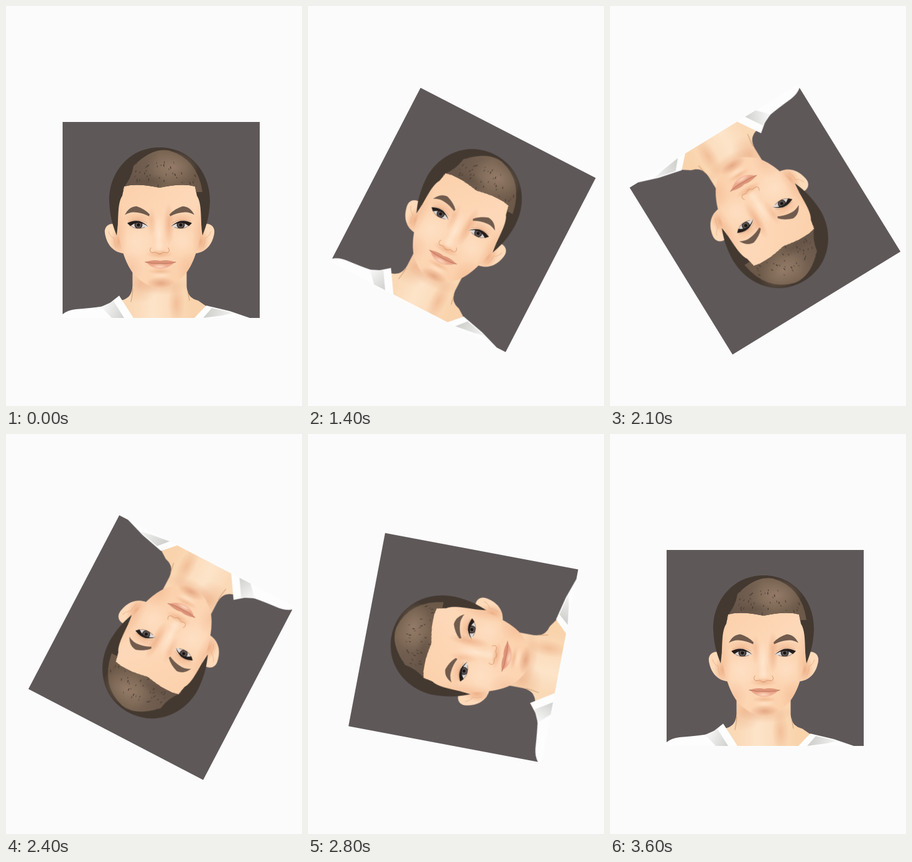
These frames come from a looping animation (476x645 px, 4.4 s). An HTML page with a canvas:

```html
<!DOCTYPE html>
<html lang="en">
<head>
<meta charset="utf-8">
<title>Rotating portrait</title>
<style>
html, body { margin: 0; width: 100%; height: 100%; overflow: hidden; background: #fbfbfb; }
canvas { display: block; }
</style>
</head>
<body>
<canvas id="stage" width="476" height="645"></canvas>
<script>
const W = 476, H = 645, LOOP = 4400, STEP = 100;
const CENTER = { x: 249.5, y: 344.7 };
const AXIS = 247;
const stage = document.getElementById('stage').getContext('2d');

// Moments (ms) and progress of the turn, even in between.
const PACE = [[1000, .028], [1400, .1776], [1800, .3388], [2800, .689], [3600, 1]];

function angleAt(ms) {
  const t = Math.floor(ms / STEP) * STEP;
  const next = PACE.findIndex(([time]) => time > t);
  if (next < 1) return 0;
  const [t0, p0] = PACE[next - 1], [t1, p1] = PACE[next];
  const progress = p0 + (p1 - p0) * (t - t0) / (t1 - t0);
  return Math.PI * (1 - Math.cos(Math.PI * progress));
}

function seeded(seed) {
  return () => (seed = (seed * 16807) % 2147483647) / 2147483647;
}

// Builds a path from one half; x counts outwards from the face axis.
function mirrored(half) {
  const path = new Path2D(), side = new Path2D(half);
  for (const s of [-1, 1]) path.addPath(side, new DOMMatrix([s, 0, 0, 1, AXIS, 0]));
  return path;
}

function drawPortrait(g) {
  const toPath = p => typeof p === 'string' ? new Path2D(p) : p;
  const fill = (color, path) => {
    g.fillStyle = color;
    g.fill(toPath(path));
  };
  const line = (color, width, path) => {
    g.strokeStyle = color;
    g.lineWidth = width;
    g.stroke(toPath(path));
  };
  const linear = (x0, y0, x1, y1, ...colors) => {
    const grad = g.createLinearGradient(x0, y0, x1, y1);
    colors.forEach((c, i) => grad.addColorStop(i / (colors.length - 1), c));
    return grad;
  };
  const glow = (x, y, rx, ry, rgb, alpha) => {
    g.save();
    g.translate(x, y);
    g.scale(rx, ry);
    const grad = g.createRadialGradient(0, 0, 0, 0, 0, 1);
    grad.addColorStop(0, `rgba(${rgb},${alpha})`);
    grad.addColorStop(.5, `rgba(${rgb},${alpha * .5})`);
    grad.addColorStop(1, `rgba(${rgb},0)`);
    g.fillStyle = grad;
    g.fillRect(-1, -1, 2, 2);
    g.restore();
  };
  const glowPair = (u, ...rest) => [-1, 1].forEach(s => glow(AXIS + s * u, ...rest));
  const inside = (path, draw) => {
    g.save();
    g.clip(path);
    draw();
    g.restore();
  };
  const SHADE = '228,150,105', LIGHT = '255,234,212';

  function drawBody() {
    const neck = mirrored('M0 410H43.5V452C45 468 52 472 62 475L75 484L58 503H0Z');
    fill(linear(204, 0, 300, 0, '#fad9b7', '#fde4c9', '#fbdcbb', '#f9d3ac'), neck);
    inside(neck, () => {
      glow(216, 446, 30, 34, SHADE, .4);
      glow(250, 450, 46, 16, SHADE, .4);
      glow(274, 480, 14, 34, SHADE, .4);
    });
    line('#c0906a', .8, 'M204 456Q203 468 201 477M292 459L295 475');
    fill('#fdfdfd', 'M91 497Q100 490 112 489Q150 486 162 483L182 467L205 503H91ZM322 483L360 492L392 503H303Z');
    fill(linear(152, 485, 190, 502, '#fafafa', '#d0d0cd'), 'M153 485L173 476L190 503H170Z');
    fill(linear(322, 490, 366, 498, '#cfcfcc', '#f4f4f3'), 'M331 487L366 495L348 499L317 503Z');
  }

  function drawEars() {
    const ears = mirrored('M64 357C76 345 90 354 88 366C86 380 78 397 57 399Z');
    fill('#fddab9', ears);
    inside(ears, () => glowPair(66, 380, 14, 24, SHADE, .6));
    line('#eab48e', 1, mirrored('M82 364Q79 373 73 374Q74 382 70 389'));
  }

  function drawFace() {
    const face = mirrored('M0 282H60C66 300 69 330 67 360C63 390 54 418 40 434C26 448 14 454 0 454Z');
    fill(linear(180, 300, 312, 430, '#fcd1ac', '#fdd8b8', '#fbcfa9'), face);
    inside(face, () => {
      glowPair(37, 380, 27, 28, LIGHT, .45);
      glowPair(68, 372, 16, 60, SHADE, .3);
      glowPair(48, 424, 22, 28, SHADE, .25);
      glowPair(34, 343, 26, 10, SHADE, .35);
      glow(262, 352, 9, 34, SHADE, .5);
      glow(234, 348, 7, 24, SHADE, .3);
      glow(249, 447, 24, 10, '214,140,105', .6);
      glow(249, 434, 18, 6, LIGHT, .5);
    });
  }

  function drawHair() {
    const hair = mirrored('M0 228C50 228 82 270 81 315C80 340 75 355 69 370C65 345 69 320 60 306L57 291C40 286 20 289 0 293Z');
    const random = seeded(73);
    fill('#433930', hair);
    inside(hair, () => {
      fill(linear(195, 290, 315, 270, '#66554a', '#7a6553', '#6a5747'),
        'M188 294Q202 278 205 258Q235 228 262 233Q308 246 316 300H188Z');
      glow(267, 260, 42, 28, '160,134,114', .7);
      glow(228, 284, 36, 14, '85,69,57', .4);
      for (let i = 0; i < 40; i++) {
        const x = 208 + random() * 96, y = 250 + random() * 40;
        line('#493c32', .7 + random() * .7, `M${x} ${y}l${(x - 250) / 35} ${1 + random() * 2}`);
      }
    });
  }

  function drawEyes() {
    fill('#705b4d', mirrored('M16 336Q24 327 37 323Q49 323 56 337Q47 331 36 333Q27 334 17 339Z'));
    line('#d5a17f', .8, mirrored('M20 350Q34 341 50 347'));
    const eyes = mirrored('M19 355Q34 340 50 351Q44 358 35 359Q25 359 19 355Z');
    fill('#dedad8', eyes);
    inside(eyes, () => {
      [['#38312f', 6.5], ['#625b59', 4.6], ['#171413', 2.6]].forEach(([color, r]) => {
        g.fillStyle = color;
        [-1, 1].forEach(s => {
          g.beginPath();
          g.arc(AXIS + s * 34, 353, r, 0, 7);
          g.fill();
        });
      });
    });
    fill('#241d1b', mirrored('M18 356Q33 340 52 350L47 355Q34 344 18 356Z'));
    line('#8d6655', .8, mirrored('M24 357Q38 362 47 354'));
  }

  function drawNoseAndMouth() {
    glow(246, 368, 8, 34, LIGHT, .8);
    glow(247, 387, 11, 9, LIGHT, .5);
    glow(247, 400, 22, 7, SHADE, .5);
    line('#d99970', 1, mirrored('M14 390Q18 396 12 398L6 397Q3 400 0 400'));
    fill('#dd957a', 'M223 413Q238 408 248 411Q258 408 273 413Q248 418 223 413Z');
    fill(linear(0, 414, 0, 425, '#e79f84', '#f6b99b'), 'M226 414Q248 417 271 414Q259 424 248 424Q236 424 226 414Z');
    glow(247, 420, 13, 4, LIGHT, .7);
    line('#b96f58', 1, 'M224 413Q236 416 248 415Q262 416 273 413');
    glow(248, 428, 20, 5, SHADE, .4);
  }

  g.lineCap = g.lineJoin = 'round';
  fill('#5f5859', 'M91 187h317v316h-317Z');
  drawBody();
  drawEars();
  drawFace();
  drawHair();
  drawEyes();
  drawNoseAndMouth();
}

const portrait = document.createElement('canvas');
portrait.width = W;
portrait.height = H;
drawPortrait(portrait.getContext('2d'));

function render(now) {
  stage.setTransform(1, 0, 0, 1, 0, 0);
  stage.fillStyle = '#fbfbfb';
  stage.fillRect(0, 0, W, H);
  const angle = angleAt(Math.max(0, now - start) % LOOP);
  // The resting picture sits on whole pixels.
  if (angle) {
    stage.translate(CENTER.x, CENTER.y);
    stage.rotate(angle);
    stage.translate(-CENTER.x, -CENTER.y);
  }
  stage.drawImage(portrait, 0, 0);
  requestAnimationFrame(render);
}

const start = performance.now();
render(start);
</script>
</body>
</html>
```
